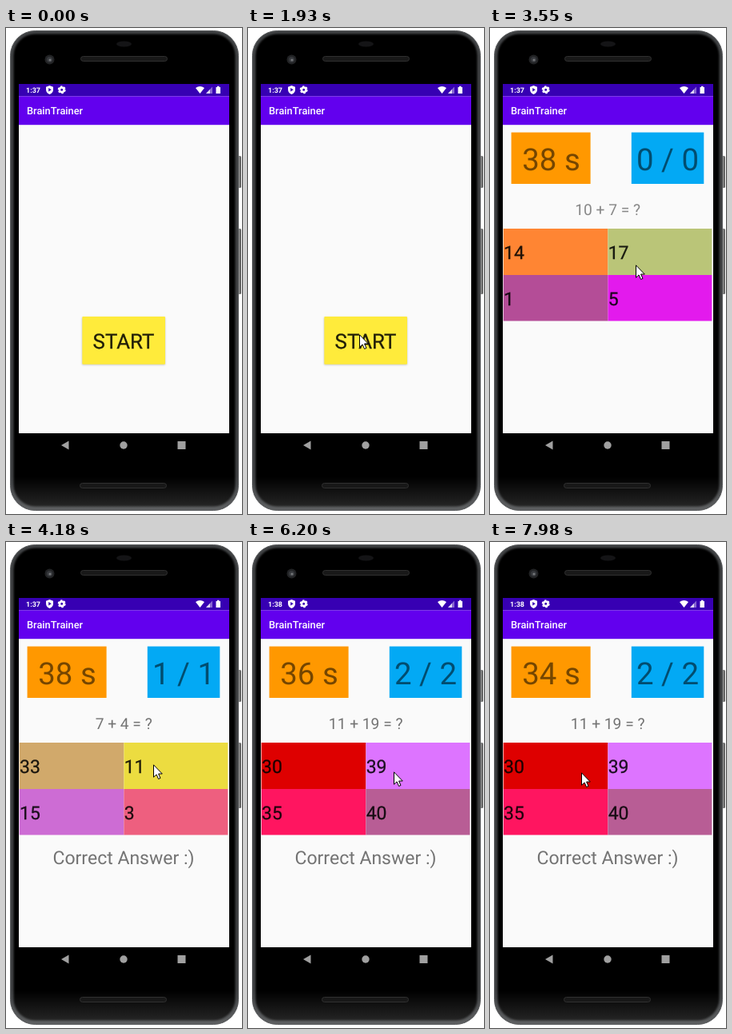
Write an HTML page that moves like this. It is 295 px wide and 608 px high and loops after 8000 ms.

```html
<!DOCTYPE html>
<html lang="en">
<head>
<meta charset="utf-8">
<title>BrainTrainer</title>
<style>
  html, body { margin: 0; width: 100%; height: 100%; overflow: hidden; background: #fff; }
  svg.stage { display: block; width: 295px; height: 608px; }
  text { font-family: Roboto, "Open Sans", sans-serif; text-rendering: geometricPrecision; }
  .mid { text-anchor: middle; }
  .big { font-size: 38.4px; fill: rgba(0,0,0,.54); }
  .ask { font-size: 19.2px; }
  .note { font-size: 23px; fill: rgba(0,0,0,.54); }
  .bold { stroke: #000; stroke-width: .3px; opacity: .87; }
  .cell { font-size: 23px; }
  .clock { font-size: 9px; font-weight: 700; fill: #fff; }

  /* one shared 8 s clock: 1% = 80 ms */
  .anim { animation: 8s step-end infinite; }
  #start { animation-name: start; }
  #game { animation-name: game; }
  #round0 { animation-name: round0; }
  #round1 { animation-name: round1; }
  #round2 { animation-name: round2; }
  #note { animation-name: note; }
  #early { animation-name: early; }
  #late { animation-name: late; }
  #ring { animation-name: ring; }
  #ticks { animation-name: ticks; }
  #cursor { animation-name: cursor; }

  @keyframes start { 0% { opacity: 1 } 28.875%, 100% { opacity: 0 } }
  @keyframes game { 0% { opacity: 0 } 28.875%, 100% { opacity: 1 } }
  @keyframes round0 { 0% { opacity: 1 } 52.25%, 100% { opacity: 0 } }
  @keyframes round1 { 0% { opacity: 0 } 52.25% { opacity: 1 } 77.5%, 100% { opacity: 0 } }
  @keyframes round2 { 0% { opacity: 0 } 77.5%, 100% { opacity: 1 } }
  @keyframes note { 0% { opacity: 0 } 52.25%, 100% { opacity: 1 } }
  @keyframes early { 0% { opacity: 1 } 59.875%, 100% { opacity: 0 } }
  @keyframes late { 0% { opacity: 0 } 59.875%, 100% { opacity: 1 } }
  @keyframes ring {
    0% { opacity: 0 }
    27% { opacity: 1 } 28.875% { opacity: 0 }
    51.25% { opacity: 1 } 52.25% { opacity: 0 }
    76.625% { opacity: 1 } 77.5%, 100% { opacity: 0 }
  }
  @keyframes ticks {
    0% { transform: translateY(0) }
    41.625% { transform: translateY(-64px) }
    54.125% { transform: translateY(-128px) }
    66.75% { transform: translateY(-192px) }
    79.5% { transform: translateY(-256px) }
    92.125%, 100% { transform: translateY(-320px) }
  }
  @keyframes cursor {
    0% { transform: translate(221px, 640px) }
    14.5% { transform: translate(221px, 587px); animation-timing-function: steps(5) }
    19.3125% { transform: translate(115px, 440px); animation-timing-function: steps(5) }
    24.125% { transform: translate(139px, 383px) }
    38.625% { transform: translate(139px, 383px); animation-timing-function: steps(6, jump-both) }
    44.375% { transform: translate(182px, 296px); animation-timing-function: steps(4) }
    48.375% { transform: translate(184px, 278px) }
    67.75% { transform: translate(184px, 280px) }
    68.625% { transform: translate(184px, 281px) }
    70.75% { transform: translate(182px, 285px) }
    74.5% { transform: translate(182px, 287px) }
    92.125% { transform: translate(182px, 287px); animation-timing-function: steps(8) }
    99.75%, 100% { transform: translate(114px, 288px) }
  }
</style>
</head>
<body>
<svg class="stage" viewBox="0 0 295 608" xmlns="http://www.w3.org/2000/svg">
  <defs>
    <linearGradient id="key" x1="0" x2="1" y1="0" y2="0">
      <stop offset="0" stop-color="#2a2a2a"/>
      <stop offset=".6" stop-color="#8a8a8a"/>
      <stop offset="1" stop-color="#4c4c4c"/>
    </linearGradient>
    <linearGradient id="sheen" x1="0" x2="0" y1="0" y2="1">
      <stop offset=".93" stop-color="#fff" stop-opacity="0"/>
      <stop offset="1" stop-color="#fff" stop-opacity=".16"/>
    </linearGradient>
    <filter id="soft" x="-10%" y="-10%" width="120%" height="125%">
      <feGaussianBlur stdDeviation="1"/>
    </filter>
  </defs>

  <!-- phone -->
  <g id="phone">
    <rect x="288" y="160" width="6" height="40" rx="1.5" fill="url(#key)"/>
    <rect x="288" y="251" width="6" height="82" rx="1.5" fill="url(#key)"/>
    <rect x="5.500" y="3.500" width="285" height="600" rx="31" fill="#404244" stroke="#5a5c5e"/>
    <rect x="9.500" y="7.500" width="277" height="591" rx="27" fill="#000" filter="url(#soft)"/>
    <rect x="6" y="4" width="284" height="599" rx="30.500" fill="url(#sheen)"/>
    <ellipse cx="147.500" cy="20" rx="9.500" ry="3.500" fill="#141416"/>
    <g fill="#181818" stroke="#303030">
      <rect x="93.500" y="35.500" width="108" height="6" rx="3"/>
      <rect x="92.500" y="569.500" width="108" height="6" rx="3"/>
    </g>
    <circle cx="54.500" cy="39.500" r="6" fill="#222325"/>
    <circle cx="54.500" cy="39.500" r="3.600" fill="#36383c"/>
    <circle cx="55" cy="40" r="1.600" fill="#75777a"/>
    <g fill="#a0a0a0">
      <path d="M69 522 78.500 516.500V527.500Z"/>
      <circle cx="147" cy="522" r="4.700"/>
      <rect x="214.500" y="517" width="10" height="10"/>
    </g>
  </g>

  <!-- app frame -->
  <rect x="16" y="70" width="263" height="437" fill="#fafafa"/>
  <rect x="16" y="70" width="263" height="15.400" fill="#3700b3"/>
  <rect x="16" y="85.400" width="263" height="35.800" fill="#6200ee"/>
  <text x="26" y="108" font-size="12.8" font-weight="500" fill="#fff">BrainTrainer</text>
  <text id="early" class="clock anim" x="25" y="81">1:37</text>
  <text id="late" class="clock anim" x="25" y="81">1:38</text>
  <g fill="#fff">
    <path d="M54.500 72 59 73.700V77Q59 81 54.500 83 50 81 50 77V73.700Z"/>
    <path d="M53.200 75V79.500L56.800 77.200Z" fill="#3700b3"/>
    <g fill="none" stroke="#fff">
      <circle cx="69.700" cy="77.300" r="2.800" stroke-width="2.600"/>
      <circle cx="69.700" cy="77.300" r="4.300" stroke-width="1.400" stroke-dasharray="2.400 2.103"/>
    </g>
    <path d="M237 75Q242.500 70.800 248 75L242.500 82Z"/>
    <path d="M250 82 258 73.500V82Z" opacity=".4"/>
    <path d="M250 82 255 76.700V82Z" opacity=".75"/>
    <path d="M262.500 74H264V72.700H266.500V74H268V82H262.500Z"/>
  </g>

  <!-- first screen -->
  <g id="start" class="anim">
    <rect x="95" y="362" width="104" height="59.500" rx="1" opacity=".22" filter="url(#soft)"/>
    <rect x="95.300" y="361" width="103.700" height="59.700" rx="1" fill="#ffeb3b"/>
    <text class="bold mid" x="147" y="400.500" font-size="25.8">START</text>
  </g>

  <!-- quiz screen -->
  <g id="game" class="anim">
    <rect x="26.600" y="130.600" width="99" height="64.400" fill="#ff9800"/>
    <rect x="176.800" y="130.600" width="90.500" height="64.400" fill="#03a9f4"/>
    <svg x="27" y="131" width="99" height="64"><g id="ticks" class="anim"></g></svg>
    <g id="rounds"></g>
    <text id="note" class="note mid anim" x="147" y="402.500">Correct Answer :)</text>
  </g>

  <!-- pointer -->
  <g id="cursor" class="anim">
    <circle id="ring" class="anim" r="12" fill="#ff0" fill-opacity=".47"/>
    <path d="M.5 .8V16.200L4.100 12.900 6.600 18.500 9 17.400 6.600 12H11.300Z" fill="#fff" stroke="#000" stroke-width="1"/>
  </g>
</svg>
<script>
  const rounds = [
    { ask: "10 + 7 = ?", score: "0 / 0", tone: 0.46,
      cells: [["14", "#ff8533"], ["17", "#bac578"], ["1", "#b44d97"], ["5", "#e31aed"]] },
    { ask: "7 + 4 = ?", score: "1 / 1", tone: 0.54,
      cells: [["33", "#d1a96b"], ["11", "#ecdc40"], ["15", "#cd6cd4"], ["3", "#ee5f7f"]] },
    { ask: "11 + 19 = ?", score: "2 / 2", tone: 0.54,
      cells: [["30", "#de0000"], ["39", "#dd74ff"], ["35", "#ff1560"], ["40", "#b85d95"]] }
  ];

  const cell = ([label, color], i) => {
    const x = i % 2 ? 147.4 : 16.7;
    const y = i < 2 ? 251 : 309;
    const w = i % 2 ? 130 : 130.7;
    const h = i < 2 ? 58 : 57.5;
    return `<rect x="${x}" y="${y}" width="${w}" height="${h}" fill="${color}"/>
      <text class="cell bold" x="${x + 0.3}" y="${y + 38}">${label}</text>`;
  };

  document.getElementById("rounds").innerHTML = rounds.map((r, i) =>
    `<g id="round${i}" class="anim">
      <text class="big mid" x="222" y="178">${r.score}</text>
      <text class="ask mid" x="147.2" y="234.3" fill-opacity="${r.tone}">${r.ask}</text>
      ${r.cells.map(cell).join("")}
    </g>`).join("");

  // countdown strip, scrolled one row per second
  document.getElementById("ticks").innerHTML = Array.from({ length: 6 }, (_, i) =>
    `<text class="big mid" x="49.5" y="${47 + 64 * i}">${39 - i} s</text>`).join("");
</script>
</body>
</html>
```
